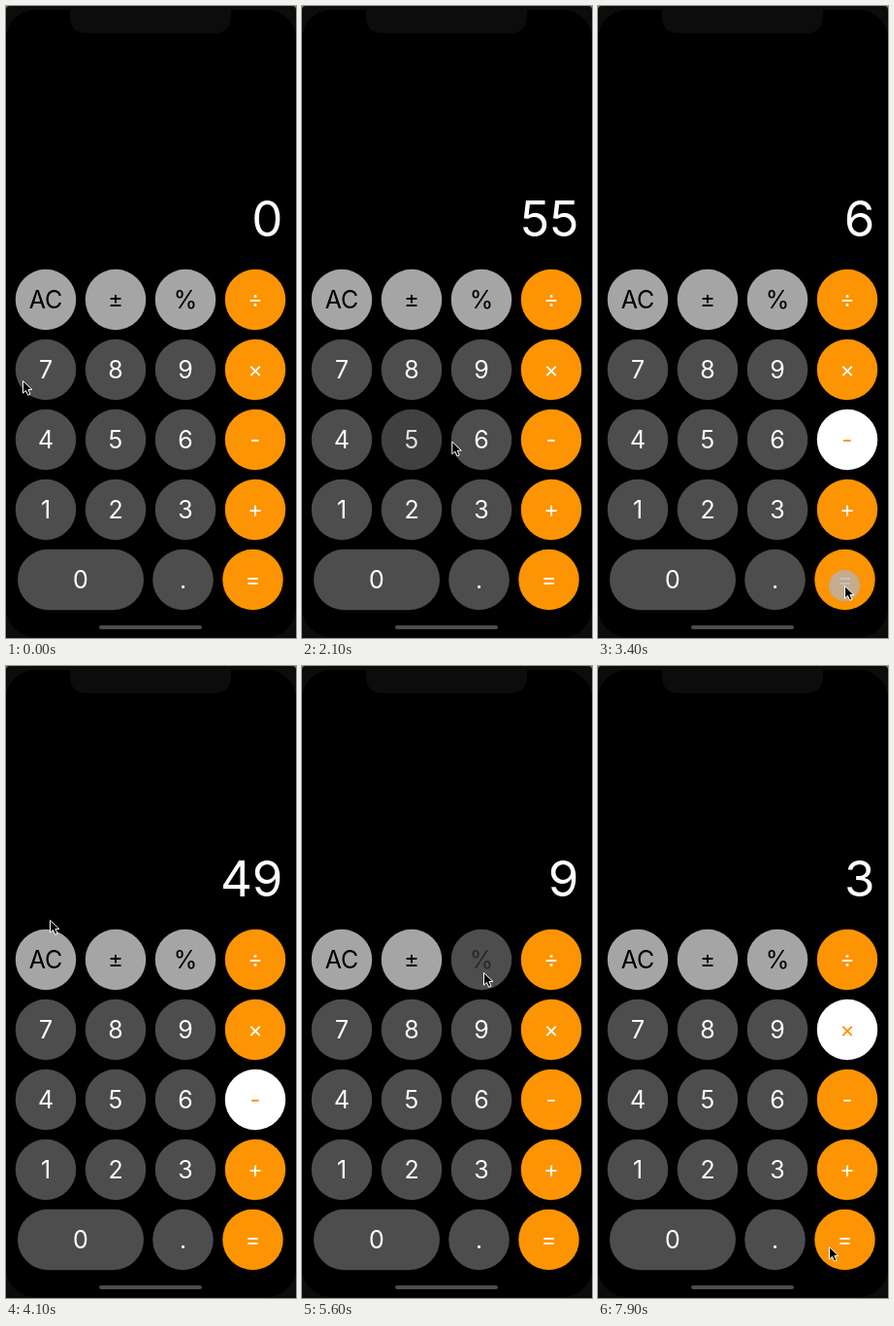
These frames come from a looping animation (299 by 650 pixels, 8 s). An HTML page:

```html
<!DOCTYPE html>
<html lang="en">
<head>
<meta charset="utf-8">
<title>Calculator</title>
<style>
  html, body { margin: 0; width: 100%; height: 100%; overflow: hidden; background: #777; }
  svg { display: block; width: 299px; height: 650px; }
  text { font-family: Inter, Roboto, sans-serif; fill: #fff; text-anchor: middle; }
  #display { font-size: 51px; text-anchor: end; }
</style>
</head>
<body>
<svg viewBox="0 0 299 650">
  <path d="M4 0H295Q299 0 299 4V650H0V4Q0 0 4 0Z" fill="#0c0c0c"/>
  <rect y="4" width="299" height="645" rx="30"/>
  <path d="M66 0V10Q66 28 84 28H214Q232 28 232 10V0Z" fill="#0c0c0c"/>
  <rect x="96" y="637" width="106" height="4" rx="2" fill="#4d4d4d"/>
  <text id="display" x="285.5" y="237">0</text>
  <g id="keys"></g>
  <circle id="touch" r="16" fill="#b4b4b4" opacity=".78"/>
  <path id="cursor" d="M.5 .5V13.2L3.5 10.5L5.7 15.3L8 14.3L5.9 9.6H10Z" stroke="#fff" stroke-linejoin="round"/>
</svg>
<script>
const LOOP = 8000, STEP = 100;
const HOLD = 200, TRAVEL = 500, RELEASE = 200;
const ORANGE = '#fc9403', LIGHT = '#a5a5a5', DARK = '#4d4d4d';
const $ = id => document.getElementById(id);
const keys = {};

function add(tag, attrs, parent) {
  const el = document.createElementNS('http://www.w3.org/2000/svg', tag);
  for (const name in attrs) el.setAttribute(name, attrs[name]);
  return parent.appendChild(el);
}

function addKey(label, cx, cy, color, width = 62.5) {
  const symbol = '±÷×-+='.includes(label);
  const face = add('rect', {
    x: cx - width / 2, y: cy - 31.25, width, height: 62.5, rx: 31.25
  }, $('keys'));
  const text = add('text', {
    x: cx, y: cy + (symbol ? 8 : 9), 'font-size': symbol ? 23.5 : 25
  }, $('keys'));
  text.textContent = label;
  keys[label] = { face, text, color, ink: color === LIGHT ? '#000' : '#fff' };
}

['AC ± % ÷', '7 8 9 ×', '4 5 6 -', '1 2 3 +'].forEach((row, r) =>
  row.split(' ').forEach((label, c) =>
    addKey(label, 41 + 72 * c, 302 + 72 * r, c === 3 ? ORANGE : r ? DARK : LIGHT)));
addKey('0', 77, 590, DARK, 130);
addKey('.', 182.5, 590, DARK);
addKey('=', 254.5, 590, ORANGE);

// Pointer stops; those with a key press it on arrival.
const stop = (time, x, y, key) => ({ time, x, y, key });
const stops = [
  stop(0, 17, 385), stop(700, 42, 455),
  stop(1300, 118, 445, '5'), stop(1800, 118, 445, '5'),
  stop(2300, 258, 455, '-'), stop(2800, 191, 456, '6'), stop(3400, 254, 596, '='),
  stop(3900, 45, 261), stop(4200, 45, 300, 'AC'),
  stop(4900, 187, 380, '9'), stop(5500, 187, 315, '%'),
  stop(6500, 258, 383, '×'), stop(7400, 188, 518, '3'), stop(7900, 238, 597)
];
const fade = [1, 0.47, 0.34, 0.85];

function pointer(t) {
  const i = stops.findLastIndex(s => s.time <= t);
  const a = stops[i], b = stops[i + 1] || a;
  const from = Math.max(a.time + HOLD, b.time - TRAVEL);
  const k = t <= from ? 0 : Math.min(1, (t - from) / (b.time - from));
  const ease = k * k * (3 - 2 * k);
  return [a.x + (b.x - a.x) * ease, a.y + (b.y - a.y) * ease];
}

const solve = (a, op, b) => ({ '+': a + b, '-': a - b, '×': a * b, '÷': a / b })[op] ?? b;

function press(calc, key) {
  const { shown, op, stored, fresh } = calc;
  if (key === 'AC') return { shown: '0', op: '', stored: 0, fresh: true };
  if (key === '%') return { ...calc, shown: String(shown / 100) };
  if (key === '=') return { ...calc, shown: String(solve(stored, op, +shown)), fresh: true };
  if ('+-×÷'.includes(key)) return { ...calc, op: key, stored: +shown, fresh: true };
  return { ...calc, shown: fresh ? key : shown + key, fresh: false };
}

function draw(t) {
  const at = `translate(${pointer(t).join(' ')})`;
  const taps = stops.filter(s => s.key && s.time <= t);
  const last = taps.at(-1);
  const phase = last ? (t - last.time) / STEP : -1;
  const { shown, op } = taps.filter(s => s.time + RELEASE <= t)
    .reduce((calc, s) => press(calc, s.key), press({}, 'AC'));

  $('cursor').setAttribute('transform', at);
  $('touch').setAttribute('transform', at);
  $('touch').style.visibility = phase === 0 ? 'visible' : 'hidden';
  $('display').textContent = shown;
  for (const label in keys) {
    const { face, text, color, ink } = keys[label];
    const on = label === op;
    face.style.fill = on ? '#fff' : color;
    text.style.fill = on ? ORANGE : ink;
    face.style.opacity = text.style.opacity = label === last?.key ? fade[phase] ?? 1 : 1;
  }
}

const start = performance.now();
function tick() {
  const t = (performance.now() - start) % LOOP;
  draw(Math.floor(t / STEP) * STEP);
  requestAnimationFrame(tick);
}
tick();
</script>
</body>
</html>
```
